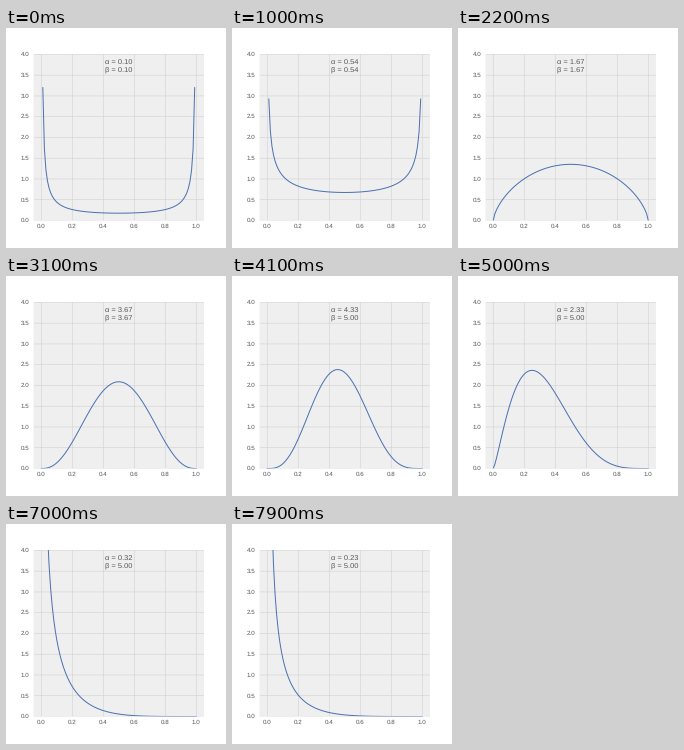
Write a matplotlib script that moves like this. It is 220 px wide and 220 px high and loops after 8000 ms.

```python
from math import gamma

import matplotlib.pyplot as plt
import numpy as np
from matplotlib.animation import FuncAnimation
from matplotlib.patches import Rectangle
from matplotlib.transforms import Affine2D

DPI = 100
PX = 72 / DPI  # one pixel in points
STAGE = 220
LEFT, RIGHT, TOP, BOTTOM = 27.5, 198, 26.4, 192.5  # plot area in pixels from the top left
INK = "#555555"

plt.rcParams["font.family"] = ["Liberation Sans", "DejaVu Sans"]
plt.rcParams["text.hinting"] = "none"

# Parameter sweep: slow below one, fast above it.
rise = np.concatenate([np.linspace(0.1, 0.9, 19), np.linspace(1, 5, 19)])
flat = np.full(len(rise), 5.0)
alphas = np.concatenate([rise, rise[::-1], rise])[:80]
betas = np.concatenate([rise, flat, flat])[:80]

x = np.linspace(0, 1, 100)


def beta_pdf(a, b):
    norm = gamma(a) * gamma(b) / gamma(a + b)
    with np.errstate(divide="ignore"):
        y = x ** (a - 1) * (1 - x) ** (b - 1) / norm
    return np.where(np.isfinite(y), y, np.nan)


fig = plt.figure(figsize=(STAGE / DPI, STAGE / DPI), dpi=DPI, facecolor="white")


def box(left, top, right, bottom, color, zorder):
    fig.add_artist(Rectangle((left / STAGE, 1 - bottom / STAGE),
                             (right - left) / STAGE, (bottom - top) / STAGE,
                             facecolor=color, linewidth=0, snap=False, zorder=zorder))


# Grey panel, with a white strip that trims the curve softly at the baseline.
box(LEFT, TOP, RIGHT, BOTTOM + 0.5, "#efefef", -1)
box(LEFT - 1, BOTTOM, RIGHT + 1, BOTTOM + 1.5, "white", 1)

ax = fig.add_axes([LEFT / STAGE, 1 - BOTTOM / STAGE,
                   (RIGHT - LEFT) / STAGE, (BOTTOM - TOP) / STAGE], facecolor="none")
ax.set_xlim(-0.05, 1.05)
ax.set_ylim(0, 4)
ax.set_xticks(np.arange(0, 1.1, 0.2))
ax.set_yticks(np.arange(0, 4.1, 0.5))
ax.xaxis.set_major_formatter("{x:.1f}")
ax.yaxis.set_major_formatter("{x:.1f}")
ax.tick_params(length=0, pad=4 * PX, labelsize=6.3 * PX, labelcolor=INK)
ax.grid(color="#d0d0d0", linewidth=0.55 * PX, snap=False)
ax.set_axisbelow(True)
for spine in ax.spines.values():
    spine.set_visible(False)

lift = Affine2D().translate(0, 0.45)
for tick in ax.get_xticklabels() + ax.get_yticklabels():
    tick.set_transform(tick.get_transform() + lift)

curve, = ax.plot([], [], color="#4c72b0", linewidth=1.0 * PX)


def label(baseline):
    return fig.text(112.7 / STAGE, 1 - baseline / STAGE, "", fontsize=7.5 * PX,
                    color=INK, ha="center", va="baseline")


alpha_text = label(36.4)
beta_text = label(43.2)


def update(i):
    a, b = alphas[i], betas[i]
    curve.set_data(x, beta_pdf(a, b))
    alpha_text.set_text(f"α = {a:.2f}")
    beta_text.set_text(f"β = {b:.2f}")
    return curve, alpha_text, beta_text


anim = FuncAnimation(fig, update, frames=len(alphas), interval=100,
                     repeat=True, repeat_delay=0)
plt.show()
```
